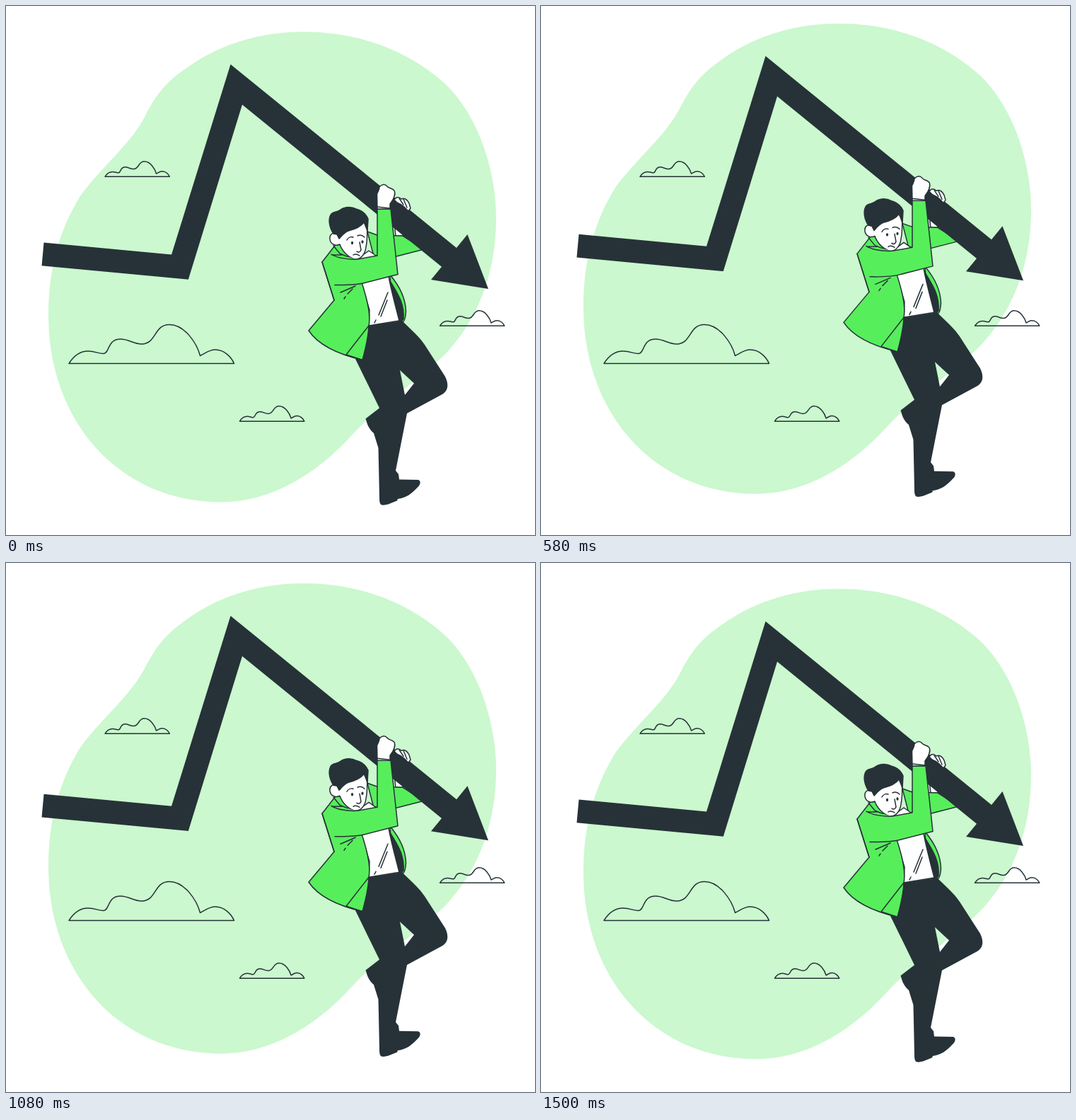
Animation, 748 px wide and 748 px high, one loop 1540 ms. Source, as an HTML page:

```html
<!DOCTYPE html>
<html lang="en">
<head>
<meta charset="utf-8">
<title>Falling arrow</title>
<style>
  html, body { margin: 0; width: 100%; height: 100%; overflow: hidden; background: #fff; }
  svg { display: block; width: 100%; height: 100%; }
  .dark { fill: #263238; }
  .green { fill: #57ee5c; }
  .white { fill: #fff; }
  .line { fill: none; }
  .ink { stroke: #263238; stroke-width: 1.5; stroke-linecap: round; stroke-linejoin: round; }
  .cloud { fill: none; vector-effect: non-scaling-stroke; }
</style>
</head>
<body>
<svg viewBox="0 0 748 748">
  <defs>
    <path id="cloud" class="cloud ink" d="M0 0C5-8 14-17.500 27-17.500C37-17.500 43-13.500 49-14C58-15 54-34.500 73-34.500C85-34.500 91-27.500 103-27.500C124-28 120-55 142-55C164-55 181-28 185.500-11C192-14 198-19.500 207-19.500C220-19.500 230-8.500 233.500 0Z"/>
  </defs>

  <g id="float">
    <path fill="#cbf8ce" d="M420 36.500C520 36.500 586 78 622 111C668 156 693 232 693 300C693 370 672 435 626 487C600 515 545 555 510 586C488 605 462 644 402 676C370 693 335 701.500 305 701.500C161 701.500 60 589 60 437C60 375 74 318 106 267C138 225 176 195 196 157C216 118 231 104 262 83C306 53 362 36.500 420 36.500Z"/>
  </g>

  <g id="clouds">
    <use href="#cloud" transform="translate(89 505.500)"/>
    <use href="#cloud" transform="translate(140 241.300) scale(.391)"/>
    <use href="#cloud" transform="translate(613.500 452.300) scale(.391)"/>
    <use href="#cloud" transform="translate(330.500 587.200) scale(.391)"/>
  </g>

  <g id="figure">
    <!-- far arm -->
    <g class="ink">
      <path class="white" d="M547 290L561 304V325H551Z"/>
      <path class="green" d="M511 319L525 324L561 325L591 344L552 354L520 354Z"/>
    </g>

    <path class="dark" d="M53.500 334.500L234 351.500L317.500 82.500L637 342L652.500 323L682 400L601 387L616 368.700L334 139.500L257.800 386.700L50.500 367.200Z"/>

    <g class="ink">
      <path class="white" d="M549 274C552 269 556 270 559 273C563 271 567 273 570 279L572 286L569 290L563 284L559 281L553 278Z"/>
      <path class="line" d="M556 272L562 281M562 273L567 285"/>
    </g>

    <!-- legs -->
    <path class="dark" fill-rule="evenodd" d="M513 452L560 445C574 459 584 467 592 479L621 524C625 532 627 543 617 549L567 576L551 657L555 662L556 669.500L583 670C587 671.500 586 676.500 583 679.500C573 690.500 566 695 554 697L553 699.500L543 703.500C538 705.500 533 706.500 530 705C528 702.500 528 699 528 695L526.500 625L520 604C513 598 511 592 508.500 583.500L528 568.500L494 499ZM557 515L564 550L577 533.500Z"/>

    <!-- jacket and shirt -->
    <g class="ink">
      <path class="green" d="M543 380C554 393 565 412 565.500 432C565 440 564 445 561 447L545 420Z"/>
      <path class="dark" d="M541 385C550 402 564 417 562 443L555 447L549 415Z"/>
      <path class="white" d="M502 391L541 382C544 400 551 425 556 445L513 452L514 430Z"/>
      <path class="green" d="M468 335L447 362L464 416L428 459C442 480 472 493 504 500.500C508 486 512 471 513 453C515 440 514 425 503 391L525 353L490 350Z"/>
      <path class="line" d="M504 500.500L481 493L513 452"/>
      <path class="white" d="M499 356L513 346L523 353L524 358H500Z"/>
      <path class="line" d="M540 405L527 437M539 416L530 439M523 444L521 448M463 339L472 350L484 355"/>
    </g>

    <!-- head -->
    <g transform="translate(0 1)">
      <g class="ink">
        <path class="white" d="M470 322C463 317 457 322 458 329C459 336 466 339 472 336C475 345 483 354 493 357C502 358 508 349 509 340C511 330 511 315 510 300L485 305Z"/>
        <path class="dark" d="M463 321C457 312 455 300 460 293C464 289 469 291 473 287C480 282 490 283 495 286C503 288 509 293 512 300L511 317C509 312 508 308 506 305C501 312 492 315 484 317C477 320 474 325 471 328L468 322Z"/>
        <path class="line" d="M482 330C484 326 488 325 491 326M497 324C501 322 505 324 507 326M500 333L502 344C501 347 498 348 496 346M491 351C494 349 497 350 500 352"/>
      </g>
      <ellipse class="dark" cx="489.500" cy="334" rx="1.600" ry="2.200"/>
      <ellipse class="dark" cx="504" cy="332.500" rx="1.600" ry="2.200"/>
    </g>

    <!-- near arm -->
    <path class="green" d="M459 350L449 362L466 394L503 393L554 379L544 287H525V353L497 358Z"/>
    <g class="ink">
      <path class="line" d="M465 394.500C480 394.500 495 395 507 391.500L554 379.500L544 287H525V353L497 358C480 359 466 355 460 351M461 352L475 352M447 362L464 416M473 405L494 396M490 400L483 407M480 411L478 414"/>
      <path class="white" d="M525 287L524.500 266C526 262 528 260 528 256C531 252 536 251 539 255C541 258 545 257 549 261C551 266 549 270 547 274L543 280L543 287Z"/>
      <path class="line" d="M525 284L543 286"/>
    </g>
  </g>
</svg>
<script>
  const LOOP = 1540, FRAME = 1000 / 24, HALF = 18, RISE = 14.96, PHASE = 0.35;
  const parts = ['float', 'figure'].map(id => document.getElementById(id));

  // Linear rise and fall, stepped at 24 frames per second
  const height = n => {
    const p = (n + PHASE) % (2 * HALF);
    return RISE * (1 - Math.abs(p / HALF - 1));
  };

  function draw() {
    const n = Math.floor((performance.now() % LOOP + 5) / FRAME);
    const y = height(0) - height(Math.min(n, 2 * HALF));
    for (const part of parts) part.setAttribute('transform', `translate(0 ${y.toFixed(2)})`);
    requestAnimationFrame(draw);
  }
  draw();
</script>
</body>
</html>
```
